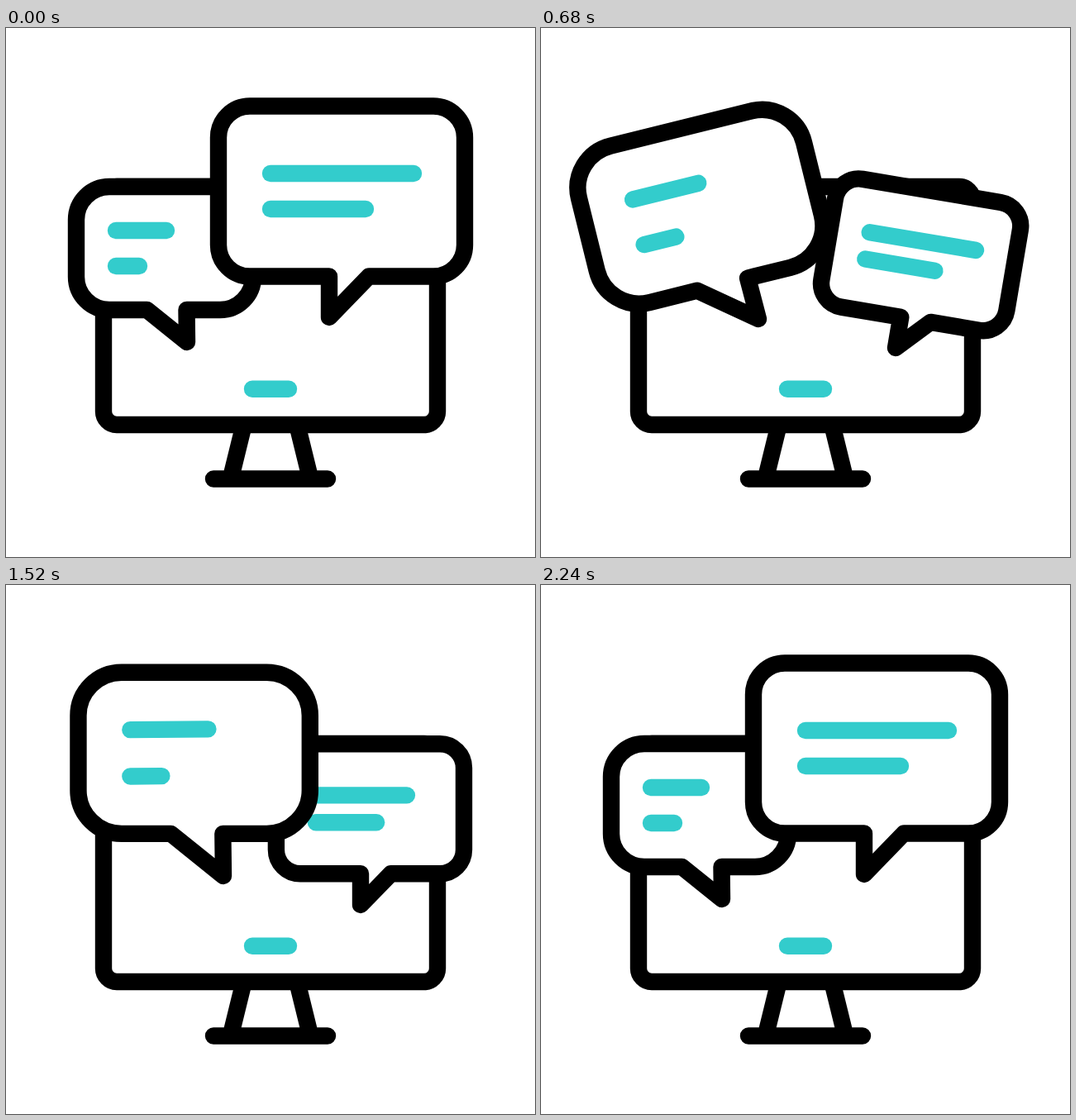
Animation of 640 by 640 pixels, one loop 2400 ms. Source, as an HTML page:

```html
<!DOCTYPE html>
<html lang="en">
<head>
<meta charset="utf-8">
<title>Chat on a monitor</title>
<style>
  html, body { margin: 0; width: 100%; height: 100%; overflow: hidden; background: #fff; }
  svg { display: block; width: 100%; height: 100%; }
  path { fill: none; stroke: #000; stroke-width: 20.4; stroke-linecap: round; stroke-linejoin: round;
         vector-effect: non-scaling-stroke; }
  .solid { fill: #fff; }
  .accent { stroke: #3cc; }
</style>
</head>
<body>
<svg viewBox="0 0 640 640">
  <path d="M286.8 484L272.8 541M353.2 484L367.2 541M251 545.5H389"/>
  <path class="solid" d="M134 192H506a16 16 0 0 1 16 16V464a16 16 0 0 1-16 16H134a16 16 0 0 1-16-16V208a16 16 0 0 1 16-16Z"/>
  <path class="accent" d="M298 436.8H342"/>
  <g id="bubbles"></g>
</svg>
<script>
const LOOP = 2400;
const layer = document.getElementById('bubbles');

function add(parent, className) {
  const path = document.createElementNS('http://www.w3.org/2000/svg', 'path');
  path.setAttribute('class', className);
  parent.append(path);
  return path;
}

// Eased 0 to 1 between two times; a bias below 1 gives a faster start.
function ramp(t, start, end, bias = 1) {
  const u = Math.min(1, Math.max(0, (t - start) / (end - start))) ** bias;
  return u * u * (3 - 2 * u);
}

const pulse = (t, start, peak, end) => ramp(t, start, peak) * (1 - ramp(t, peak, end, 0.78));
const swing = (t, settle) => 27 * (pulse(t, 200, 500, settle) + pulse(t, 1580, 1910, 2240));
const swapped = t => ramp(t, 200, 600) - ramp(t, 1800, 2240);

// Outlines are drawn around the tip of the tail, the pivot of each bubble.
function outline({ x, y, w, h, r, tail }) {
  const arc = (dx, dy) => `a${r} ${r} 0 0 1 ${dx} ${dy}`;
  return `M${x + r} ${y}h${w - 2 * r}${arc(r, r)}v${h - 2 * r}${arc(-r, r)}` +
    `L${tail + 48} ${y + h}L0 0L${tail} ${y + h}L${x + r} ${y + h}` +
    `${arc(-r, -r)}v${2 * r - h}${arc(r, -r)}Z`;
}

function makeBubble(spec) {
  const group = document.createElementNS('http://www.w3.org/2000/svg', 'g');
  layer.append(group);
  add(group, 'solid').setAttribute('d', outline(spec));
  return { ...spec, group, strokes: spec.lines.map(() => add(group, 'accent')) };
}

const left = makeBubble({
  x: -134, y: -188, w: 214, h: 149, r: 40, tail: -48.5,
  tip: p => [219 + 44 * p, 380 - 28 * p],
  scale: p => 1 + 0.31 * p,
  turn: t => 9 * pulse(t, 500, 1200, 1460) - swing(t, 1000),
  indent: 48, top: 53, shrink: 0.45, slope: -0.055,
  lines: [{ length: 61, grow: 19, backBy: 1880 }, { length: 28, grow: 36, backBy: 1720 }]
});

const right = makeBubble({
  x: -134, y: -255.5, w: 298, h: 206, r: 38, tail: 0,
  tip: p => {
    const bulge = (4 * p * (1 - p)) ** 3;
    return [391 + 38 * p + 5 * bulge, 350 + 37 * p - 6.5 * bulge];
  },
  scale: p => 1 - 0.238 * p,
  turn: t => swing(t, 850),
  indent: 63, top: 81.5, shrink: 0, slope: 0,
  lines: [{ length: 173, grow: -35, backBy: 1870 }, { length: 115, grow: -45, backBy: 1820 }]
});

function drawLine(b, i, t) {
  const { length, grow, backBy } = b.lines[i];
  const grown = ramp(t, 620, 1010) - ramp(t, 1390 - 240 * i, backBy);
  const shrunk = b.shrink * (ramp(t, 1390 - 240 * i, backBy) - ramp(t, 1880, 2200));
  const width = length * (1 - shrunk) + grow * grown;
  const rise = width * b.slope * pulse(t, 1400, 1880, 2200);
  b.strokes[i].setAttribute('d', `M${b.x + b.indent} ${b.y + b.top + 43 * i}l${width} ${rise}`);
}

function drawBubble(b, t) {
  const p = swapped(t);
  b.group.setAttribute('transform',
    `translate(${b.tip(p)}) rotate(${b.turn(t)}) scale(${b.scale(p)})`);
  b.lines.forEach((_, i) => drawLine(b, i, t));
}

function tick() {
  const t = performance.now() % LOOP;
  drawBubble(left, t);
  drawBubble(right, t);
  const front = t > 500 && t < 1920 ? left : right;
  if (layer.lastChild !== front.group) layer.append(front.group);
  requestAnimationFrame(tick);
}
tick();
</script>
</body>
</html>
```
